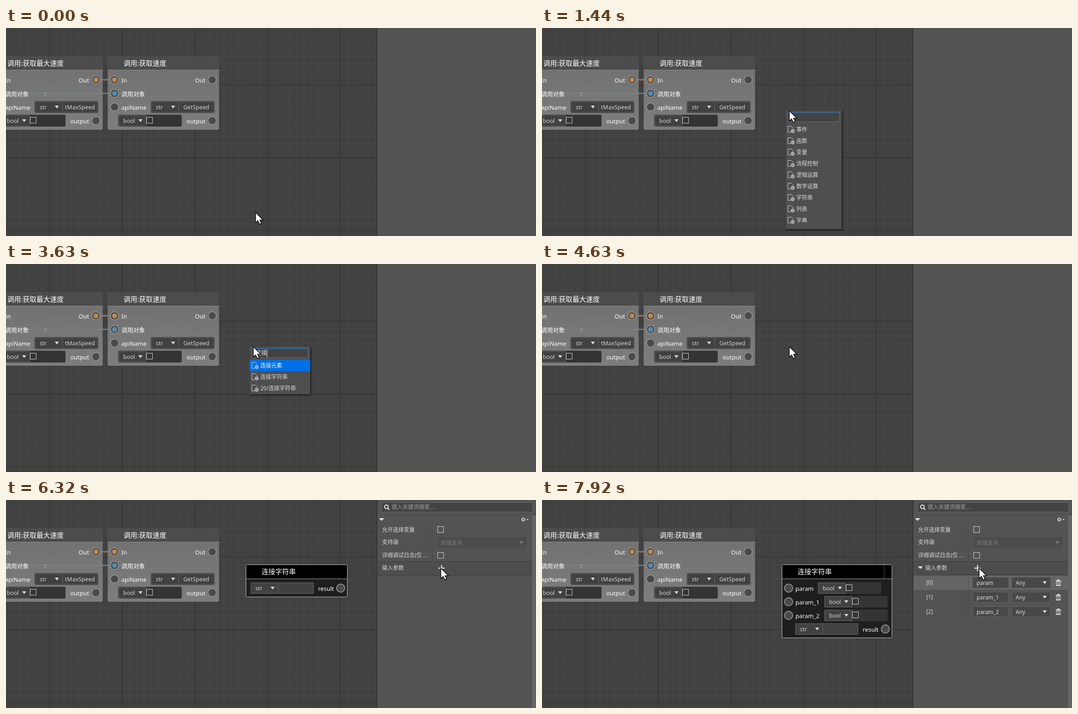
Animation of 1167x458 px, one loop 7.99 s. Source, as an HTML page with a canvas:

```html
<!DOCTYPE html>
<html lang="zh">
<head>
<meta charset="utf-8">
<style>
  html, body { margin: 0; width: 100%; height: 100%; overflow: hidden; background: #535353; }
  canvas { display: block; }
</style>
</head>
<body>
<canvas id="stage" width="1167" height="458"></canvas>
<script>
const ctx = document.getElementById('stage').getContext('2d');
const LOOP = 7990, TICK = 70;
const FONT = '"Noto Sans", "Noto Sans CJK SC", "Noto Sans CJK", sans-serif';

function rect(x, y, w, h, fill) {
  ctx.fillStyle = fill;
  ctx.fillRect(x, y, w, h);
}

function frame(x, y, w, h, stroke, fill) {
  if (fill) rect(x, y, w, h, fill);
  ctx.strokeStyle = stroke;
  ctx.lineWidth = 1;
  ctx.strokeRect(x + .5, y + .5, w - 1, h - 1);
}

function rounded(x, y, w, h, r, fill) {
  ctx.fillStyle = fill;
  ctx.beginPath();
  ctx.roundRect(x, y, w, h, r);
  ctx.fill();
}

// Text placed by its vertical centre
function text(str, x, cy, size, color, align = 'left') {
  ctx.font = `${size}px ${FONT}`;
  ctx.textAlign = align;
  ctx.fillStyle = color;
  ctx.fillText(str, x, Math.round(cy + size * .37));
}

function polygon(points, fill) {
  ctx.beginPath();
  points.forEach(([x, y]) => ctx.lineTo(x, y));
  ctx.closePath();
  ctx.fillStyle = fill;
  ctx.fill();
}

function line(points, color, width) {
  ctx.beginPath();
  points.forEach(([x, y]) => ctx.lineTo(x, y));
  ctx.strokeStyle = color;
  ctx.lineWidth = width;
  ctx.stroke();
}

function circle(x, y, r, fill, stroke, width) {
  ctx.beginPath();
  ctx.arc(x, y, r, 0, Math.PI * 2);
  if (fill) { ctx.fillStyle = fill; ctx.fill(); }
  if (stroke) { ctx.strokeStyle = stroke; ctx.lineWidth = width; ctx.stroke(); }
}

const arrow = (x, y, color = '#dcdcdc', half = 4.5) =>
  polygon([[x - half, y - 3], [x + half, y - 3], [x, y + 3]], color);

const checkbox = (x, y) => frame(x, y, 14, 14, '#d6d6d6');

function port(x, y, dot) {
  circle(x, y, 9, '#4a4a4a', '#8f8f8f', 2);
  if (dot) circle(x, y, 5.2, dot);
}

/* ---------- graph ---------- */

const ORANGE = '#ca8848', BLUE = '#5090bb';

function grid() {
  rect(0, 0, 818, 458, '#414141');
  for (let x = 15; x < 815; x += 16) rect(x, 0, 1, 458, '#4a4a4a');
  for (let y = 14; y < 458; y += 16) rect(0, y, 815, 1, '#4a4a4a');
  for (let x = 95; x < 815; x += 160) rect(x, 0, 2, 458, '#373737');
  for (let y = 125; y < 458; y += 160) rect(0, y, 815, 2, '#373737');
}

function field(x, y, type, value) {
  rounded(x, y, 140, 26, 3, '#343434');
  frame(x + 1, y + 1, 61, 24, '#626262', '#414141');
  text(type, x + 11, y + 13.5, 12.5, '#d2d2d2');
  arrow(x + 49, y + 13);
  if (type === 'bool') return checkbox(x + 62, y + 5);
  frame(x + 61, y + 1, 78, 24, '#626262', '#414141');
  text(value, x + 100, y + 13.5, 12.5, '#d2d2d2', 'center');
}

function callNode(x, title, apiName, outDot) {
  const y = 62, w = 245;
  const body = ctx.createLinearGradient(0, 93, 0, 224);
  body.addColorStop(0, 'rgba(125,125,125,.82)');
  body.addColorStop(1, 'rgba(138,138,138,.82)');
  rounded(x, y, w, 31, [3, 3, 0, 0], 'rgba(78,78,78,.85)');
  rounded(x, 93, w, 131, [0, 0, 3, 3], body);
  rect(x, 92, w, 1, '#8c8c8c');
  text(title, x + 35, 77, 15, '#fff');

  port(x + 15, 114, ORANGE);
  port(x + 15, 144, BLUE);
  port(x + 15, 174);
  ['In', '调用对象', 'apiName'].forEach((label, i) => text(label, x + 30, 115 + 30 * i, 13, '#fff'));
  field(x + 95, 161, 'str', apiName);
  field(x + 23, 191, 'bool');

  port(x + 230, 114, outDot);
  port(x + 230, 204);
  text('Out', x + 215, 115, 13, '#fff', 'right');
  text('output', x + 215, 205, 13, '#fff', 'right');
}

function paramName(i) { return i ? 'param_' + i : 'param'; }

function joinNode(count) {
  const x = 528, y = 142;
  const w = [224, 229, 243, 243][count], h = 72 + 30 * count;
  const right = x + w, outY = y + 52 + 30 * count;
  rounded(x, y, w, h, 3, '#1e1e1e');
  rounded(x, y, w, 31, [3, 3, 0, 0], '#000');
  if (count > 1) rect(751, y + 1, 5, 30, '#141414');
  rect(x, y + 31, w, 1, '#a0a0a0');
  ctx.strokeStyle = '#c4c4c4';
  ctx.lineWidth = 1;
  ctx.beginPath();
  ctx.roundRect(x + .5, y + .5, w - 1, h - 1, 3);
  ctx.stroke();
  text('连接字符串', x + 35, 157, 15, '#fff');

  for (let i = 0; i < count; i++) {
    const cy = y + 52 + 30 * i;
    port(x + 15, cy);
    text(paramName(i), x + 30, cy + 1, 13, '#fff');
    field(x + (i ? 93 : 79), cy - 13, 'bool');
  }
  field(right - 214, outY - 13, 'str', '');
  text('result', right - 30, outY + 1, 13, '#fff', 'right');
  port(right - 15, outY);
}

function graph() {
  grid();
  line([[198, 114], [239, 114]], ORANGE, 2);
  line([[-32, 144], [239, 144]], '#4c9ac6', 2);
  callNode(-32, '调用:获取最大速度', 'tMaxSpeed', ORANGE);
  line([[52, 144], [212, 144]], 'rgba(104,130,165,.6)', 2);
  text('2', 83, 145, 13, '#a3a3a3');
  callNode(224, '调用:获取速度', 'GetSpeed');
}

/* ---------- search menu ---------- */

const GROUPS = ['事件', '函数', '变量', '流程控制', '逻辑运算', '数学运算', '字符串', '列表', '字典'];
const MATCHES = ['连接元素', '连接字符串', '20/连接字符串'];

function addIcon(x, y) {
  const color = '#d4d4d4';
  line([[x + 7, y + 13.5], [x + .5, y + 13.5], [x + .5, y + .5], [x + 8, y + .5], [x + 12, y + 4.5], [x + 12, y + 6]], color, 1);
  circle(x + 11, y + 11, 3.3, null, color, 1.4);
  line([[x + 8, y + 11], [x + 14, y + 11]], color, 1);
  line([[x + 11, y + 8], [x + 11, y + 14]], color, 1);
}

function menu({ query, items, width, height, selected, caret }) {
  const x = 536, y = 181;
  ctx.save();
  ctx.shadowColor = 'rgba(0,0,0,.6)';
  ctx.shadowBlur = 3;
  ctx.shadowOffsetX = ctx.shadowOffsetY = 2;
  rect(x, y, width, height, '#4f4f4f');
  ctx.restore();
  frame(x, y, width, height, '#444');
  frame(x + 5, y + 5, width - 10, 21, '#6a6a6a', '#434343');
  rect(x + 5, y + 5, width - 10, 1, '#1a84e0');
  text(query, 550, 196, 12, '#e4e4e4');
  if (caret) rect(550 + 12 * query.length, 188, 1, 17, '#fff');
  items.forEach((item, i) => {
    const top = y + 30 + 25 * i;
    if (i === selected) rect(x, top, width, 25, '#0070e6');
    addIcon(x + 5, top + 5);
    text(item, x + 24, top + 12.5, 12, i === selected ? '#fff' : '#dadada');
  });
}

function drawMenu(t) {
  if (t < 900 || t >= 4630) return;
  if (t < 2500) menu({ query: '', items: GROUPS, width: 124, height: 262, caret: t < 1440 });
  else if (t < 4030) menu({
    query: '连接', items: MATCHES, width: 134, height: t < 2570 ? 280 : 106,
    selected: 0, caret: t < 3100 || t >= 3630
  });
  else menu({ query: '连接字符串', items: MATCHES.slice(1), width: 134, height: 81, selected: 0, caret: t < 4560 });
}

/* ---------- property panel ---------- */

const LABEL = '#d8d8d8';

function gear(x, y) {
  for (let i = 0; i < 8; i++) {
    const a = i * Math.PI / 4;
    line([[x, y], [x + 4.6 * Math.cos(a), y + 4.6 * Math.sin(a)]], '#d6d6d6', 1.5);
  }
  circle(x, y, 2.6, '#535353', '#d6d6d6', 1.5);
}

function trash(x, y) {
  const color = '#e2e2e2';
  rect(x - 6, y - 5, 12, 1.5, color);
  rect(x - 2.5, y - 7, 5, 2, color);
  frame(x - 5, y - 3, 10, 10, color);
  rect(x - 4.5, y + 5, 9, 2, color);
  [-2, 1].forEach(dx => rect(x + dx, y - 2, 1, 7, color));
}

function paramRow(i) {
  const cy = 182 + 32 * i, border = i ? '#686868' : '#565656';
  if (!i) rect(818, 166, 340, 32, '#656565');
  text(`[${i}]`, 846, cy - .5, 12, LABEL);
  frame(948, cy - 12, 80, 24, border, '#484848');
  text(paramName(i), 957, cy + 1, 12, '#dedede');
  frame(1034, cy - 12, 86, 24, border, '#484848');
  text('Any', 1043, cy + .5, 12, '#dedede');
  arrow(1107, cy);
  trash(1137, cy);
}

function panel(count, pressed) {
  frame(826, 5, 334, 22, '#6a6a6a', '#434343');
  circle(837.5, 15, 4, null, '#eee', 2);
  line([[840.5, 18], [844, 21.5]], '#eee', 2);
  text('键入关键词搜索...', 849, 16, 12, '#a0a0a0');
  rect(1158, 34, 9, 424, '#646464');

  arrow(827, 43, '#e0e0e0', 6);
  gear(1139, 43);
  polygon([[1146, 42], [1151, 42], [1148.5, 45]], '#d6d6d6');

  rect(938, 52, 1, 83, '#464646');
  text('允许选择变量', 828, 66, 12, LABEL);
  checkbox(950, 58);
  text('支持端', 828, 93, 12, LABEL);
  rounded(949, 82, 197, 23, 2, '#4c4c4c');
  text('双端支持', 957, 94.5, 12, '#7c7c7c');
  arrow(1135, 94, '#7c7c7c');
  text('详细调试日志(仅 ...', 828, 122, 12, LABEL);
  checkbox(950, 115);

  rect(818, 135, 340, 31, '#4d4d4d');
  rect(818, 135, 340, 1, '#3b3b3b');
  rect(818, 165, 340, 1, '#3b3b3b');
  if (count) arrow(833, 149, '#e0e0e0', 5.5);
  text('输入参数', count ? 844 : 828, 149.5, 12, LABEL);
  if (pressed) rounded(948, 136, 26, 26, 2, '#565656');
  rect(952, 149, 14, 2, '#f2f2f2');
  rect(958, 143, 2, 14, '#f2f2f2');

  for (let i = 0; i < count; i++) paramRow(i);
  if (count) rect(938, 166, 1, 32 * count, '#464646');
}

/* ---------- pointer ---------- */

// time, x, y of the pointer tip
const PATH = [
  [0, 549, 405], [210, 541, 352], [420, 524, 242], [560, 518, 184], [630, 521, 169], [770, 536, 181],
  [900, 536, 181], [1040, 544, 181],
  [5560, 544, 181], [5770, 622, 165], [5980, 795, 137], [6120, 895, 129], [6320, 957, 149],
  [7180, 957, 149], [7320, 962, 149]
];

function pointerAt(t) {
  // Movement is sampled in ticks measured from the start of each stretch
  const start = t < 900 ? 0 : t < 5560 ? 900 : t < 7180 ? 5560 : 7180;
  const time = t >= 6320 && t < 7180 ? 6320 : start + Math.floor((t - start) / TICK) * TICK;
  const next = PATH.findIndex(p => p[0] > time);
  if (next < 0) return PATH.at(-1).slice(1);
  const [a, b] = [PATH[next - 1], PATH[next]];
  const k = (time - a[0]) / (b[0] - a[0]);
  return [a[1] + (b[1] - a[1]) * k, a[2] + (b[2] - a[2]) * k];
}

function pointer([x, y]) {
  ctx.save();
  ctx.translate(Math.round(x), Math.round(y));
  ctx.shadowColor = 'rgba(0,0,0,.45)';
  ctx.shadowBlur = 2;
  ctx.shadowOffsetX = ctx.shadowOffsetY = 1;
  polygon([[.5, 1], [.5, 24], [5.6, 19.2], [9.5, 27], [13.4, 25.2], [9.8, 17.6], [16.8, 17.6]], '#fff');
  ctx.shadowColor = 'transparent';
  ctx.strokeStyle = '#0a0a0a';
  ctx.lineWidth = 1.4;
  ctx.stroke();
  ctx.restore();
}

/* ---------- timeline ---------- */

const passed = (t, times) => times.filter(at => t >= at).length;
const PRESSES = [[6580, 6650], [6980, 7050], [7250, 7320], [7780, 7920]];

function draw(t) {
  graph();
  if (t >= 4700) joinNode(passed(t, [6650, 7050, 7450]));
  rect(815, 0, 3, 458, '#3a3a3a');
  rect(818, 0, 349, 458, '#535353');
  if (t >= 4770) panel(passed(t, [6720, 7120, 7450]), PRESSES.some(([from, to]) => t >= from && t < to));
  drawMenu(t);
  pointer(pointerAt(t));
}

const begin = performance.now();
function tick() {
  draw((performance.now() - begin) % LOOP);
  requestAnimationFrame(tick);
}
tick();
</script>
</body>
</html>
```
